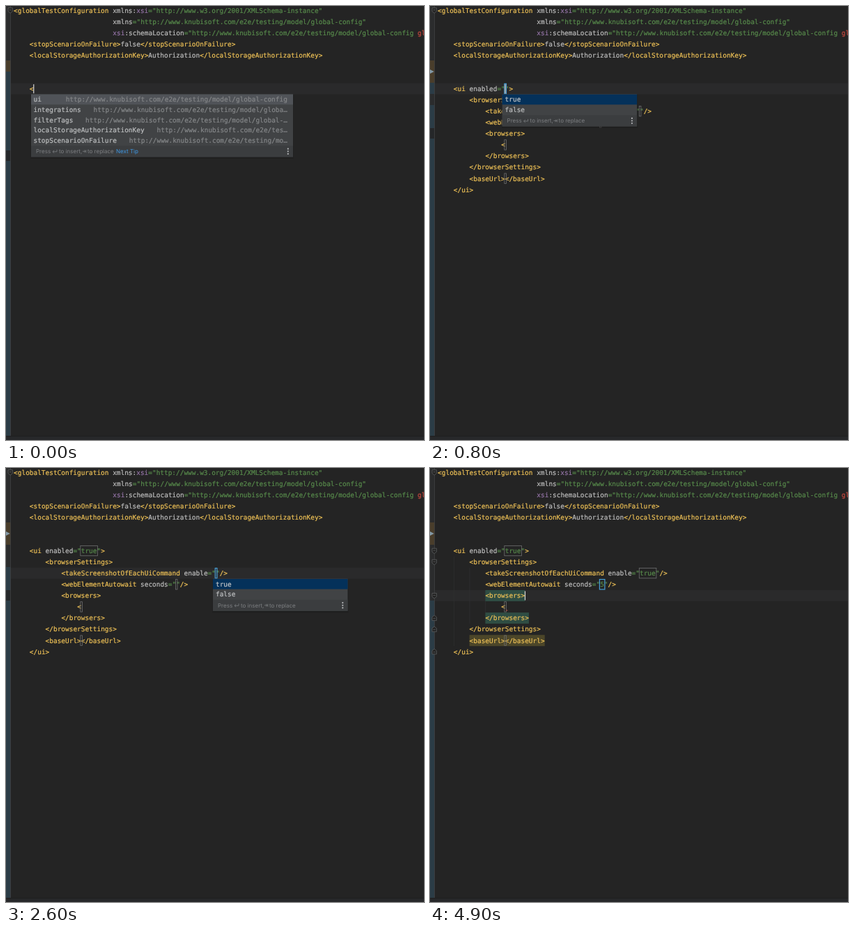
An HTML page for the animation above (5000 ms loop, 600 by 622 pixels).

```html
<!DOCTYPE html>
<html lang="en">
<head>
<meta charset="utf-8">
<title>XML completion</title>
<style>
html, body { margin: 0; width: 100%; height: 100%; overflow: hidden; background: #242424; }
svg { display: block; width: 600px; height: 622px; }
text { white-space: pre; font: 9.451px "DejaVu Sans Mono", monospace; text-rendering: geometricPrecision; stroke-width: .2; }
.hint { font: 8px Inter, sans-serif; fill: #7c7e80; }
.link { fill: #3f97e3; }
</style>
</head>
<body>
<svg id="stage" viewBox="0 0 600 622"></svg>
<script>
const LOOP = 5000, CW = 5.69, LH = 16.07, ITEM = 14.6;
const INK = { y: '#edc056', w: '#bdbdbd', g: '#578a4b', p: '#9373a5', r: '#c9493f', d: '#858789' };
const BLUE = '#04315a', GREY = '#505358';
const URL_TEXT = 'http://www.knubisoft.com/e2e/testing/model/global-config';
const TAGS = ['ui', 'integrations', 'filterTags', 'localStorageAuthorizationKey', 'stopScenarioOnFailure'];
const SHOWN = [56, 48, 50, 32, 39];

// Each step changes part of the editor state.
const STEPS = [
  [0, { row: 7, menu: 'tags', sel: 0, tint: GREY, body: false, a: '', b: '', sec: '', folds: false, match: false, field: '', caret: true }],
  [200, { tint: BLUE }],
  [300, { sel: 1 }],
  [500, { sel: 0 }],
  [700, { body: true, menu: '', field: 'a' }],
  [800, { menu: 'bool' }],
  [2000, { menu: '', a: 'true' }],
  [2300, { row: 9, field: 'b' }],
  [2500, { menu: 'bool', caret: false }],
  [3000, { caret: true }],
  [3300, { menu: '', b: 'true' }],
  [3500, { folds: true }],
  [3700, { row: 10, field: 'sec' }],
  [4000, { sec: '5' }],
  [4200, { row: 11 }],
  [4300, { match: true }]
];

const colX = c => 11.1 + c * CW;
const midY = r => 6.2 + r * LH;
const esc = s => s.replace(/&/g, '&amp;').replace(/</g, '&lt;').replace(/>/g, '&gt;');
const rect = (x, y, w, h, fill, more = '') =>
  `<rect x="${x}" y="${y}" width="${w}" height="${h}" fill="${fill}" ${more}/>`;
const path = (d, stroke, width = 1, fill = 'none') =>
  `<path d="${d}" stroke="${stroke}" stroke-width="${width}" fill="${fill}"/>`;
const label = (x, mid, s, ink) =>
  `<text x="${x}" y="${mid + 3.3}" fill="${ink}" stroke="${ink}">${esc(s)}</text>`;

// Code line: alternating ink key and text.
function code(row, col, ...parts) {
  let out = '';
  for (let i = 0; i < parts.length; i += 2) {
    const ink = INK[parts[i]];
    out += `<tspan fill="${ink}" stroke="${ink}">${esc(parts[i + 1])}</tspan>`;
  }
  return `<text x="${colX(col)}" y="${midY(row) + 3.3}">${out}</text>`;
}

function slot(row, col, len, active) {
  const x = colX(col) - 1;
  return rect(x, midY(row) - 7.3, len ? len * CW + 1.8 : 2.6, 14.4, 'none',
    `stroke="${active ? '#489fd6' : '#6e6f70'}" stroke-width="${active ? 1.2 : .8}"`);
}

const caret = (row, col) => rect(colX(col) - .4, midY(row) - 6.5, 1.2, 13, '#d8d8d8');
const wash = (row, from, to, fill) =>
  rect(colX(from), midY(row) - 8, (to - from) * CW, 16, fill);

function header() {
  return code(0, 0, 'y', '<globalTestConfiguration ', 'w', 'xmlns:', 'p', 'xsi',
      'g', '="http://www.w3.org/2001/XMLSchema-instance"') +
    code(1, 25, 'w', 'xmlns', 'g', `="${URL_TEXT}"`) +
    code(2, 25, 'p', 'xsi', 'w', ':schemaLocation', 'g', `="${URL_TEXT} `, 'r', 'global-config') +
    code(3, 4, 'y', '<stopScenarioOnFailure>', 'w', 'false', 'y', '</stopScenarioOnFailure>') +
    code(4, 4, 'y', '<localStorageAuthorizationKey>', 'w', 'Authorization', 'y', '</localStorageAuthorizationKey>');
}

function gutter(s) {
  const band = (y, end, fill) => rect(0, y, 6.5, end - y, fill);
  const blue = '#2b3c46', brown = '#493d2b', dark = '#252729';
  let out = band(0, 616, '#2b2c2d') + band(78, s.body ? 110 : 94, brown);
  if (!s.body) {
    out += band(94, 616, blue) + band(207, 222, dark);
  } else {
    if (s.row === 7) out += band(110, 126, blue);
    if (s.row < 10) out += band(142, 175, blue) + band(175, 190, dark);
    if (s.row === 10) out += band(158, 175, blue);
    out += band(190, 616, blue) + path('M0 91 L5.8 94 L0 97Z', 'none', 0, '#8399a6');
  }
  return out + rect(6.2, 0, .8, 616, '#414243');
}

function fold(row, end) {
  const y = midY(row), k = end ? -1 : 1;
  return path(`M3 ${y - 3.5 * k}H9.4V${y + 1.5 * k}L6.2 ${y + 4 * k}L3 ${y + 1.5 * k}ZM4.6 ${y - .5 * k}H7.8`,
    '#5b5d5f', .8, '#242424');
}

function folds() {
  const guide = (col, a, b) => rect(colX(col), midY(a) - 8, .7, (b - a) * LH, '#303132');
  return guide(4, 8, 16) + guide(8, 9, 14) + guide(12, 12, 13) +
    [7, 8, 11].map(r => fold(r)).join('') + [13, 14, 16].map(r => fold(r, true)).join('');
}

function body(s) {
  const on = f => s.field === f;
  let out = '';
  if (s.folds) out += folds() + wash(15, 8, 27, '#4c4629');
  if (s.match) out += wash(11, 12, 22, '#2f4d43') + wash(13, 12, 23, '#2f4d43');
  out += code(7, 4, 'y', '<ui ', 'w', 'enabled', 'g', `="${s.a}"`, 'y', '>') +
    code(8, 8, 'y', '<browserSettings>') +
    code(9, 12, 'y', '<takeScreenshotOfEachUiCommand ', 'w', 'enable', 'g', `="${s.b}"`, 'y', '/>') +
    code(10, 12, 'y', '<webElementAutowait ', 'w', 'seconds', 'g', `="${s.sec}"`, 'y', '/>') +
    code(11, 12, 'y', '<browsers>') +
    code(12, 16, 'y', '<') +
    code(13, 12, 'y', '</browsers>') +
    code(14, 8, 'y', '</browserSettings>') +
    code(15, 8, 'y', '<baseUrl></baseUrl>') +
    code(16, 4, 'y', '</ui>');
  out += slot(12, 17, 0) + slot(15, 17, 0) +
    slot(7, 17, s.a.length, on('a')) + slot(9, 51, s.b.length, on('b')) + slot(10, 41, s.sec.length, on('sec'));
  if (s.folds) out += rect(109, midY(12) + 4.5, 2.5, 1, '#b34b43');
  const spot = { 7: 17 + s.a.length, 9: 51 + s.b.length, 10: 41 + s.sec.length, 11: 22 };
  return s.caret ? out + caret(s.row, spot[s.row]) : out;
}

function frame(x, y, w, rows, sel, tint) {
  const foot = y + 1 + rows * ITEM, h = rows * ITEM + 17, m = foot + 8;
  const hint = (dx, t, cls = '') => `<text class="hint ${cls}" x="${x + dx}" y="${m + 2.8}">${t}</text>`;
  let out = rect(x - .5, y + 1, w + 1.5, h + 1.5, '#1b1b1b', 'opacity=".5"') +
    rect(x, y, w, h, '#414345') + rect(x, foot, w, y + h - foot, '#3b3d3f') +
    rect(x, y + .4 + sel * ITEM, w, ITEM, tint) +
    hint(7, 'Press') + hint(40, 'to insert,') + hint(81, 'to replace');
  const ax = x + 30.5, tx = x + 74;
  out += path(`M${ax + 6.5} ${m - 2.5}V${m + .5}H${ax + .5}M${ax + 2.7} ${m - 1.5}L${ax + .5} ${m + .5}L${ax + 2.7} ${m + 2.5}`, '#7c7e80', .8);
  out += path(`M${tx} ${m}H${tx + 4}M${tx + 2.2} ${m - 1.8}L${tx + 4} ${m}L${tx + 2.2} ${m + 1.8}M${tx + 4.8} ${m - 2}V${m + 2}`, '#7c7e80', .8);
  if (rows > 2) out += hint(122, 'Next Tip', 'link');
  for (const d of [-3.6, 0, 3.6])
    out += `<circle cx="${x + w - 7.2}" cy="${m + d}" r="1.1" fill="#b4b6b8"/>`;
  return out;
}

function tagMenu(s) {
  const x = 36, y = 126.3, w = 376;
  let out = frame(x, y, w, 5, s.sel, s.tint);
  TAGS.forEach((name, i) => {
    const mid = y + 7.7 + i * ITEM, cut = SHOWN[i] < 56;
    const full = i === s.sel && cut;
    const shown = full ? URL_TEXT.slice(0, 51) : URL_TEXT.slice(0, SHOWN[i]) + (cut ? '…' : '');
    const ux = full ? 123.4 : 404.3 - shown.length * CW;
    out += label(39.5, mid, name, '#bdbfc0') + label(ux, mid, shown, INK.d);
  });
  return `<clipPath id="box"><rect x="0" y="0" width="412.5" height="622"/></clipPath><g clip-path="url(#box)">${out}</g>`;
}

function boolMenu(s) {
  const x = s.row === 7 ? 103.6 : 297, y = s.row === 7 ? 126.3 : 158.6;
  return frame(x, y, 193.5, 2, 0, BLUE) +
    label(x + 4, y + 7.7, 'true', '#c4c6c8') + label(x + 4, y + 7.7 + ITEM, 'false', '#bdbfc0');
}

function draw(s) {
  let out = rect(0, 0, 600, 622, '#242424') + gutter(s) +
    rect(7, midY(s.row) - 8, 593, 16, '#2a2a2b') +
    fold(0) + header();
  out += s.body ? body(s) : code(7, 4, 'y', '<') + caret(7, 5);
  if (s.menu) out += s.menu === 'tags' ? tagMenu(s) : boolMenu(s);
  return out + rect(0, 616, 600, 6, '#27282a') + rect(0, 616, 600, 1, '#1e1e1f');
}

const stage = document.getElementById('stage');
let last = -1;
function tick() {
  const t = performance.now() % LOOP;
  const n = STEPS.filter(([at]) => at <= t).length;
  if (n !== last) {
    stage.innerHTML = draw(Object.assign({}, ...STEPS.slice(0, n).map(p => p[1])));
    last = n;
  }
  requestAnimationFrame(tick);
}
tick();
</script>
</body>
</html>
```
